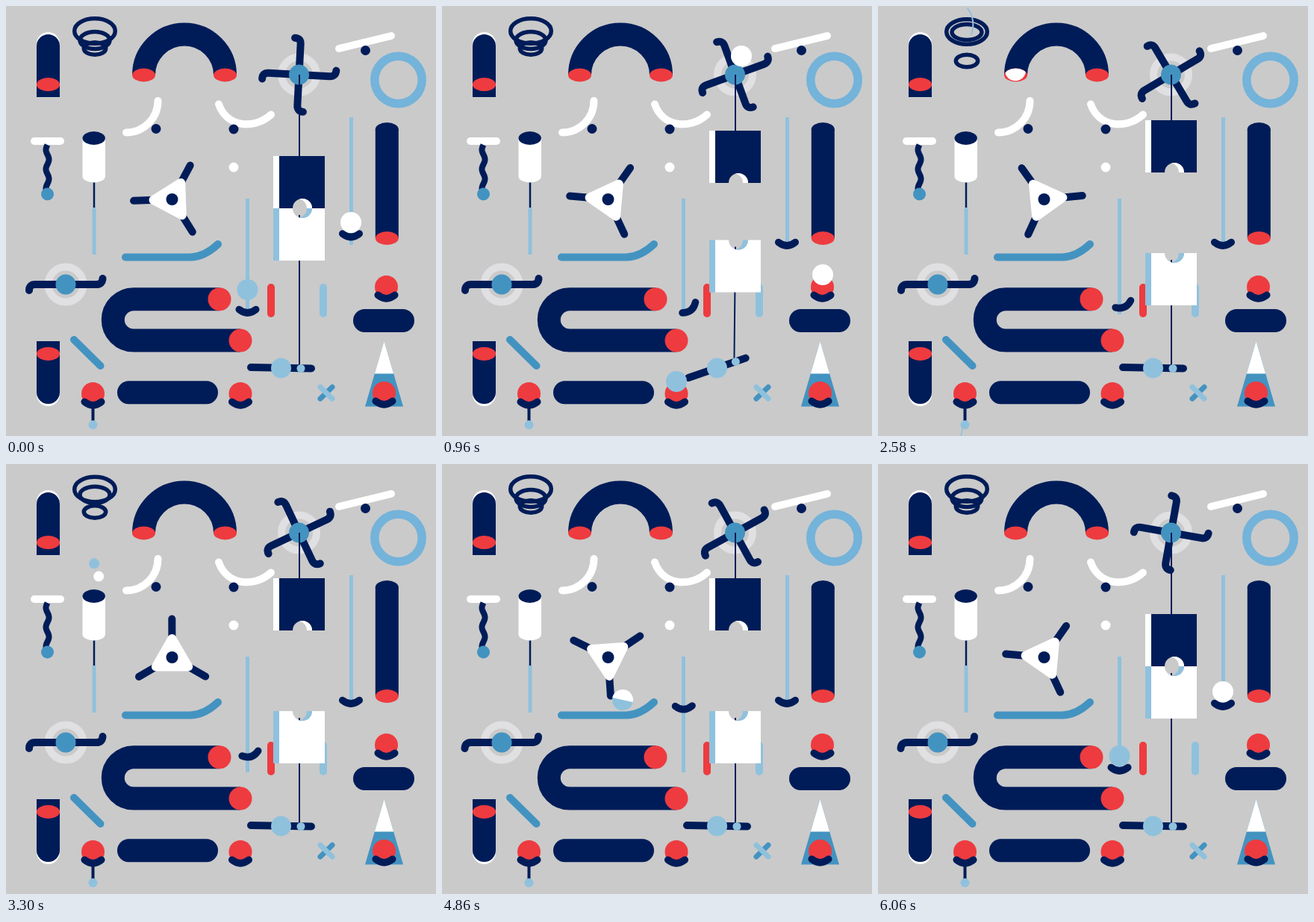
Recreate the animation shown at these times as an HTML page with a canvas. Size 576 px wide and 576 px high, loop 6.12 s.

```html
<!DOCTYPE html>
<html>
<head>
<meta charset="utf-8">
<style>
html, body { margin: 0; width: 100%; height: 100%; overflow: hidden; background: #cacaca; }
canvas { display: block; }
</style>
</head>
<body>
<canvas id="stage" width="576" height="576"></canvas>
<script>
const c = document.getElementById('stage').getContext('2d');
const LOOP = 6120, STEP = 60, TAU = Math.PI * 2, RAD = Math.PI / 180;
const GRAVITY = 0.0014; // px per ms squared
const NAVY = '#001c58', RED = '#ee3b3f', WHITE = '#ffffff', MID = '#4393c1',
      LIGHT = '#8fc1dd', RING = '#74b3da', HALO = '#e0e0e3', BG = '#cacaca';

const ramp = (t, a, b) => Math.max(0, Math.min(1, (t - a) / (b - a)));
const smooth = v => v * v * (3 - 2 * v);
const easeOut = v => 1 - (1 - v) * (1 - v);
const mix = (a, b, k) => a + (b - a) * k;

function disc(x, y, r, color) { oval(x, y, r, r, color); }
function oval(x, y, rx, ry, color) {
  c.fillStyle = color;
  c.beginPath();
  c.ellipse(x, y, rx, ry, 0, 0, TAU);
  c.fill();
}
function hoop(x, y, rx, ry, w, color) {
  c.strokeStyle = color;
  c.lineWidth = w;
  c.beginPath();
  c.ellipse(x, y, rx, ry, 0, 0, TAU);
  c.stroke();
}
function curve(d, w, color, cap = 'round') {
  c.strokeStyle = color;
  c.lineWidth = w;
  c.lineCap = cap;
  c.lineJoin = 'round';
  c.stroke(new Path2D(d));
}
function line(x1, y1, x2, y2, w, color, cap) {
  curve(`M${x1} ${y1}L${x2} ${y2}`, w, color, cap);
}
function box(x, y, w, h, color) {
  c.fillStyle = color;
  c.fillRect(x, y, w, h);
}
function shape(d, color) {
  c.fillStyle = color;
  c.fill(new Path2D(d));
}
function at(x, y, angle, draw) {
  c.save();
  c.translate(x, y);
  c.rotate(angle * RAD);
  draw();
  c.restore();
}

function cup(x, y, tilt = 0) {
  at(x, y, tilt, () => curve('M-11.3 -2Q0 7 11.3 -2', 9.5, NAVY));
}
function redCup(x, y) {
  disc(x, y, 15.5, RED);
  cup(x, y + 12.8);
}
function arm() {
  curve('M-49 8Q-49 0 -41 0L41 0Q49 0 49.5 -8', 10, NAVY);
}
function halo(x, y) { hoop(x, y, 23.5, 23.5, 10, HALO); }

// Upright tube with a red mouth at one end and a white rim at the other.
function rimTube(mouth, end, dir) {
  line(56.5, mouth, 56.5, end, 31, WHITE);
  line(56.5, mouth, 56.5, end + 3 * dir, 31, NAVY);
  box(41, mouth - 16, 31, 32, BG);
  box(41, Math.min(mouth, mouth + 17 * dir), 31, 17, NAVY);
  oval(56.5, mouth, 15.5, 9, RED);
}

function tubes() {
  rimTube(105, 50.5, 1);
  rimTube(466, 520.5, -1);
  box(41, 85, 31, 20, NAVY);
  oval(56.5, 105, 15.5, 9, RED);
  box(41, 466, 31, 20, NAVY);
  oval(56.5, 466, 15.5, 9, RED);

  curve('M184.5 92.5A54.5 54.5 0 0 1 293.5 92.5', 31, NAVY, 'butt');
  for (const x of [184.5, 293.5]) oval(x, 92.5, 15.5, 9, RED);

  oval(510.3, 165, 15.5, 9, NAVY);
  box(494.8, 165, 31, 146, NAVY);
  oval(510.3, 311, 15.5, 9, RED);

  curve('M286 392.7L171 392.7A27.7 27.7 0 0 0 171 448.1L314 448.1', 31, NAVY, 'butt');
  disc(286, 392.7, 15.5, RED);
  disc(314, 448.1, 15.5, RED);

  line(164.5, 517.7, 268.5, 517.7, 31, NAVY);
  line(480.5, 421.5, 531.5, 421.5, 31, NAVY);
}

function rails() {
  curve('M161 169.5A42.5 42.5 0 0 0 203.5 127', 10, WHITE);
  curve('M285 131.5C295 161 331 167 355 145.5', 10, WHITE);
  line(446, 57, 516, 40, 10, WHITE);
  for (const [x, y] of [[201, 164.5], [305, 165], [481.5, 59.5]]) disc(x, y, 6.5, NAVY);
  disc(305, 216, 6.5, WHITE);
  curve('M160 336.5L247 336.5Q266 336 284 319', 10, MID);
  line(91, 447, 126.5, 482, 10, MID);
  line(355, 377, 355, 412, 10, RED);
  line(425, 377, 425, 412, 10, LIGHT);
  hoop(525.5, 99, 31.7, 31.7, 11.5, RING);
}

function corkscrew() {
  line(38, 181, 73, 181, 10, WHITE);
  c.strokeStyle = NAVY;
  c.lineWidth = 8;
  c.lineCap = 'butt';
  c.beginPath();
  for (let y = 186; y <= 247; y++) c.lineTo(55.5 - 2 * Math.sin((y - 186) / 26 * TAU), y);
  c.stroke();
  disc(55.5, 252, 8.5, MID);
}

function coneAndCross() {
  shape('M506.5 449L481 536.5L532 536.5Z', MID);
  shape('M506.5 449L493.8 492.5L519.2 492.5Z', WHITE);
  line(437, 510.5, 421, 526, 7, MID);
  line(421, 510.5, 437, 526, 7, LIGHT);
}

function spring(t) {
  const u = ramp(t, 2400, 3840);
  const s = Math.sin(u * 2 * TAU) * (1 - ramp(t, 2580, 3840));
  hoop(119, 33.5 + s, 27.3, 16.7, 5.5, NAVY);
  hoop(119, 46 - 11 * s, 20, 11.5 - s, 5.5, NAVY);
  hoop(119, 57 + 16.5 * s, 14.7, 8.2, 5.5, NAVY);
  if (t > 2490 && t < 2700) {
    curve('M120 3C127 13 130 24 125 38', 2, LIGHT);
    line(113, 567, 111, 576, 1.5, LIGHT);
  }
}

function piston(t) {
  const k = smooth(ramp(t, 3360, 3960)) * (1 - smooth(ramp(t, 4140, 4740)));
  const y = 69 * k, rod = 270 - 90 * k;
  line(118, rod, 118, rod + 63, 5, LIGHT, 'butt');
  line(118, 230 + y, 118 + 6 * k, 270 + 55 * k, 2.5, NAVY, 'butt');
  box(102.5, 177 + y, 30.5, 51, WHITE);
  oval(117.7, 228 + y, 15.2, 8.5, WHITE);
  oval(117.7, 177 + y, 15.2, 9, NAVY);
}

const spin = t => -720 * t / LOOP;

function triangle(t) {
  at(222.5, 259, spin(t) - 2, () => {
    const p = [180, 300, 60].map(a => [Math.cos(a * RAD), Math.sin(a * RAD)]);
    p.forEach(([x, y]) => line(0, 0, x * 51.5, y * 51.5, 10, NAVY));
    const d = 'M' + p.map(([x, y]) => `${x * 25} ${y * 25}`).join('L') + 'Z';
    curve(d, 12, WHITE);
    shape(d, WHITE);
  });
  disc(222.5, 259, 8, NAVY);
}

function spinner(t) {
  halo(80, 373);
  at(80, 373, -180 * smooth(ramp(t, 3300, 4620)), arm);
  disc(80, 373, 13.5, MID);
}

function pinwheel(t) {
  halo(392.5, 92);
  for (const a of [3, 93]) at(392.5, 92, a + spin(t), arm);
  disc(392.5, 92, 13.5, MID);
}

// One half of the split box; edge is the seam, dir +1 hangs below it.
function card(edge, dir, face, side) {
  const y = dir > 0 ? edge : edge - 70;
  box(358, y, 8.5, 70, side);
  c.fillStyle = face;
  c.beginPath();
  c.rect(366, y, 61, 70);
  c.moveTo(410, edge);
  c.arc(397, edge, 13, 0, Math.PI, dir < 0);
  c.closePath();
  c.fill('evenodd');
  c.save();
  c.beginPath();
  c.arc(397, edge, 13, 0, Math.PI, dir < 0);
  c.clip();
  c.fillStyle = side;
  c.beginPath();
  c.rect(380, edge - 14, 34, 28);
  c.moveTo(403, edge);
  c.arc(390, edge, 13, 0, TAU);
  c.fill('evenodd');
  c.restore();
}

function machine(t) {
  const open = easeOut(ramp(t, 840, 1100)) * (1 - smooth(ramp(t, 5400, 5640)));
  const tilt = -20 * easeOut(ramp(t, 840, 960)) * (1 - smooth(ramp(t, 1020, 1380)));
  const upper = 271 - 48 * open, lower = 271 + 60 * open;
  at(368.5, 485, tilt, () => line(-40.5, -1, 40.5, 0.5, 10, NAVY));
  disc(368.5, 485, 13.5, LIGHT);
  const kx = 368.5 + 26.5 * Math.cos(tilt * RAD), ky = 485.5 + 26.5 * Math.sin(tilt * RAD);
  line(393, lower + 9, kx - 2, ky, 2, NAVY, 'butt');
  disc(kx, ky, 5.5, LIGHT);
  line(393, 92, 393, upper - 60, 2, NAVY, 'butt');
  card(upper, -1, NAVY, WHITE);
  card(lower, 1, WHITE, LIGHT);
}

function sliders(t) {
  line(323.5, 258, 323.5, 413, 5, LIGHT, 'butt');
  line(462.5, 149, 462.5, 320, 5, LIGHT, 'butt');
  const rise = 90 * ramp(t, 900, 4980) ** 3 * (1 - smooth(ramp(t, 5800, 6020)));
  const tilt = -39 * easeOut(ramp(t, 0, 300)) * (1 - ramp(t, 1200, 5000));
  at(323.5, 395 - rise, tilt, () => cup(0, 13.5));
  cup(462, 318.5 + 4 * ramp(t, 5880, 6060) - 11.5 * (1 - ramp(t, 0, 240)));
}

// Ballistic flight through [time, x, y] contacts; a fourth value means rolling.
function fly(hops, t) {
  const last = hops.length - 1;
  if (t < hops[0][0] || t > hops[last][0]) return null;
  let i = 1;
  while (i < last && hops[i][0] < t) i++;
  const [t0, x0, y0] = hops[i - 1], [t1, x1, y1, rolls] = hops[i];
  const k = ramp(t, t0, t1);
  const lift = rolls ? 0 : GRAVITY / 2 * (t - t0) * (t1 - t);
  const size = Math.min(ramp(t, hops[0][0], hops[0][0] + 90), ramp(hops[last][0] - t, 0, 120));
  return [mix(x0, x1, k), mix(y0, y1, k) - lift, 14 * size];
}

const whiteOut = [[-480, 405, 271], [-120, 462, 300], [-60, 462, 305], [0, 462, 290],
  [960, 401, 67], [1680, 360, 83], [1920, 322, 142], [2160, 293, 92]];
const lightOut = [[-480, 375, 271], [-240, 323.5, 316], [-60, 323.5, 391], [0, 323.5, 380],
  [480, 286, 393]];
const toSeesaw = [[720, 314, 448], [960, 314, 503], [1200, 314, 519]];
const toPad = [[720, 510, 311], [960, 510, 360], [1200, 510, 376]];
const fromArch = [[2400, 188, 78], [2760, 180, 140], [3360, 118, 177]];
const fromSky = [[2640, 119, -14], [3360, 118, 177]];
const merged = [[3840, 118, 296], [4020, 127, 337], [4440, 166, 317], [4860, 242, 316, true],
  [5100, 284, 299, true], [5280, 324, 302], [5640, 396, 271]];

function ball(hops, t, color) {
  for (const time of [t, t - LOOP]) {
    const p = fly(hops, time);
    if (p) disc(...p, color);
  }
}
function mergedBall(t) {
  const p = fly(merged, t);
  if (!p) return;
  const [x, y, r] = p;
  disc(x, y, r, LIGHT);
  at(x, y, 45 + 0.282 * (t - 4020), () => {
    c.fillStyle = WHITE;
    c.beginPath();
    c.arc(0, 0, r, -Math.PI / 2, Math.PI / 2);
    c.fill();
  });
}

// The ball leaving the arch only shows inside or below its mouth.
function archBall(t) {
  c.save();
  c.beginPath();
  c.ellipse(184.5, 92.5, 15, 9, 0, Math.PI, TAU);
  c.rect(90, 92.5, 120, 110);
  c.clip();
  ball(fromArch, t, WHITE);
  c.restore();
}

function render(t) {
  box(0, 0, 576, 576, BG);
  tubes();
  rails();
  corkscrew();
  coneAndCross();
  spring(t);
  triangle(t);
  spinner(t);
  pinwheel(t);
  sliders(t);
  line(116.5, 535, 116.5, 558, 4, NAVY, 'butt');
  disc(116.5, 561, 6, LIGHT);
  for (const [x, y] of [[116.5, 519.5], [314, 519.5], [509.5, 376.5], [506.5, 518.5]]) redCup(x, y);
  mergedBall(t);
  if (t > 5000) {
    ball(lightOut, t, LIGHT);
    ball(whiteOut, t, WHITE);
  }
  machine(t);
  piston(t);
  if (t < 5000) {
    ball(lightOut, t, LIGHT);
    ball(whiteOut, t, WHITE);
  }
  archBall(t);
  ball(toSeesaw, t, LIGHT);
  ball(toPad, t, WHITE);
  ball(fromSky, t, LIGHT);
}

function tick() {
  const t = performance.now() % LOOP;
  render(Math.floor(t / STEP) * STEP);
  requestAnimationFrame(tick);
}
tick();
</script>
</body>
</html>
```
